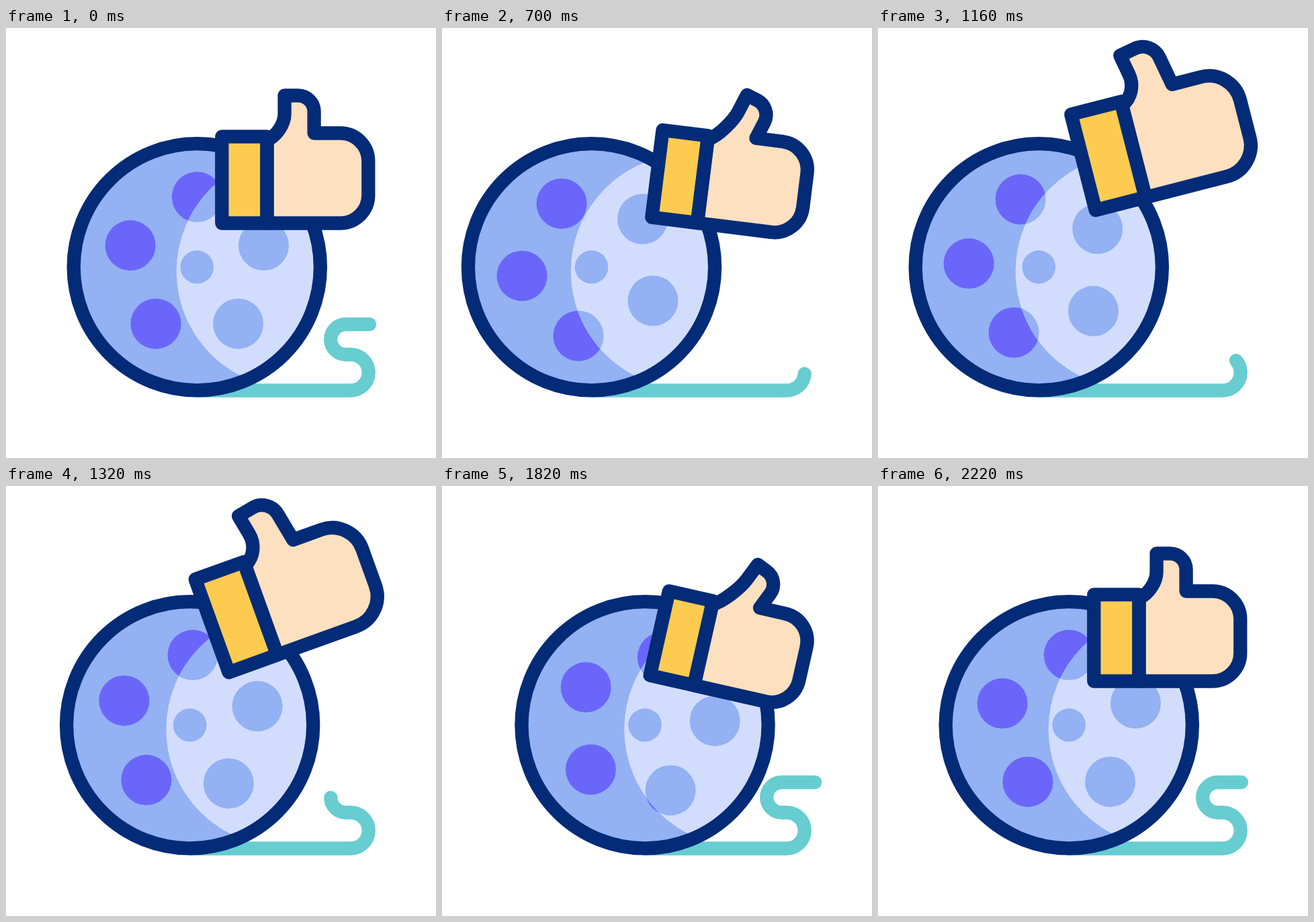
Write an HTML page with a canvas that moves like this. It is 640x640 px and loops after 2.4 s.

```html
<!DOCTYPE html>
<html lang="en">
<head>
<meta charset="utf-8">
<title>Rolling wheel and thumb</title>
<style>
html, body { margin: 0; width: 100%; height: 100%; overflow: hidden; background: #fff; }
canvas { display: block; width: 640px; height: 640px; }
</style>
</head>
<body>
<canvas id="stage" width="640" height="640"></canvas>
<script>
const ctx = document.getElementById('stage').getContext('2d');
const LOOP = 2400, LINE = 20.3, TAU = Math.PI * 2, DEG = Math.PI / 180;
const NAVY = '#032b77', BLUE = '#93b1f3', PALE = '#d2ddfd', PURPLE = '#6a66fa';
const TEAL = '#67cdd1', YELLOW = '#fdcb50', SKIN = '#fde0c0';
const START = 200, END = 2220;

// Smooth step from 0 to 1 between two times.
function ease(t, from, to) {
  const p = Math.min(1, Math.max(0, (t - from) / (to - from)));
  return p * p * (3 - 2 * p);
}

// Rises to 1, holds, then falls back to 0.
function bump(t, from, top, leave, to) {
  return ease(t, from, top) - ease(t, leave, to);
}

function disc(x, y, r, fill) {
  ctx.beginPath();
  ctx.arc(x, y, r, 0, TAU);
  ctx.fillStyle = fill;
  ctx.fill();
}

function drawThread(wheelX, pull) {
  const right = 513, left = 505.7, big = 26.75, small = 22.5;
  const length = right - wheelX + Math.PI * (big + small) +
    (right - left) + (540 - left) + pull;
  ctx.beginPath();
  ctx.moveTo(wheelX, 539.5);
  ctx.lineTo(right, 539.5);
  ctx.arc(right, 512.75, big, Math.PI / 2, -Math.PI / 2, true);
  ctx.lineTo(left, 486);
  ctx.arc(left, 463.5, small, Math.PI / 2, Math.PI * 1.5);
  ctx.lineTo(600, 441);
  ctx.setLineDash([length, 2000]);
  ctx.strokeStyle = TEAL;
  ctx.lineWidth = LINE;
  ctx.stroke();
  ctx.setLineDash([]);
}

function drawSpots(spin, fill) {
  for (let i = 0; i < 5; i++) {
    const a = (i * 72 - 90 + spin) * DEG;
    disc(104.3 * Math.cos(a), 104.3 * Math.sin(a), 37.5, fill);
  }
}

function drawWheel(x, spin, shade) {
  const r = 183.6;
  ctx.save();
  ctx.translate(x, 355.8);
  disc(0, 0, r, BLUE);
  drawSpots(spin, PURPLE);

  ctx.save();
  ctx.beginPath();
  ctx.arc(0, 0, r, 0, TAU);
  ctx.clip();
  ctx.beginPath();
  ctx.arc(143.6 + shade, 6.4, 174.2, 0, TAU);
  ctx.clip();
  ctx.fillStyle = PALE;
  ctx.fillRect(-200, -200, 400, 400);
  drawSpots(spin, BLUE);
  disc(0, 0, 24.8, BLUE);
  ctx.restore();

  ctx.beginPath();
  ctx.arc(0, 0, r, 0, TAU);
  ctx.strokeStyle = NAVY;
  ctx.lineWidth = LINE;
  ctx.stroke();
  ctx.restore();
}

// The thumb bends by an angle while the rest of the palm stays put.
function tracePalm(angle) {
  const a = angle * DEG, c = Math.cos(a), n = Math.sin(a);
  const tip = { x: 415 + 1.13 * angle, y: 100.5 - 0.26 * angle };
  const pit = { x: 459, y: 156.5 };
  const wide = (pit.x - tip.x) * c + (pit.y - tip.y) * n;
  ctx.beginPath();
  ctx.moveTo(389, 290.5);
  ctx.lineTo(498, 290.5);
  ctx.arcTo(539.7, 290.5, 539.7, 240, 41.7);
  ctx.arcTo(539.7, 156.5, 490, 156.5, 41.7);
  ctx.lineTo(pit.x, pit.y);
  ctx.arcTo(tip.x + wide * c, tip.y + wide * n, tip.x, tip.y, 24);
  ctx.lineTo(tip.x, tip.y);
  ctx.lineTo(tip.x - 27 * n, tip.y + 27 * c);
  ctx.bezierCurveTo(tip.x - 42 * n, tip.y + 42 * c, 404, 160, 389, 167);
  ctx.closePath();
}

function drawHand(x, y, tilt, size, thumb) {
  ctx.save();
  ctx.translate(x, y);
  ctx.rotate(tilt * DEG);
  ctx.scale(size, size);
  ctx.translate(-430, -225);
  ctx.lineWidth = LINE / size;
  ctx.strokeStyle = NAVY;

  tracePalm(thumb);
  ctx.fillStyle = SKIN;
  ctx.fill();
  ctx.stroke();

  ctx.beginPath();
  ctx.rect(321.7, 161.7, 67, 128.8);
  ctx.fillStyle = YELLOW;
  ctx.fill();
  ctx.stroke();
  ctx.restore();
}

function draw(t) {
  ctx.fillStyle = '#fff';
  ctx.fillRect(0, 0, 640, 640);
  ctx.lineCap = ctx.lineJoin = 'round';

  // Wheel: roll left, roll past the middle, settle.
  const back = bump(t, START, 900, 900, 1600);
  const forth = bump(t, 900, 1600, 1600, END);
  const wheelX = 284.3 - 76.9 * back + 25 * forth;
  const spin = -31.4 * back + 20.6 * forth;
  const shade = -4.7 * bump(t, 600, 1320, 1320, 1900);
  const pull = -195 * back - 4 * forth + 29 * bump(t, 1320, 1560, 1560, 2150);
  drawThread(wheelX, pull);
  drawWheel(wheelX, spin, shade);

  // Hand: dip, swing up and grow, then land and settle.
  const dip = ease(t, START, 600), land = bump(t, 1400, 1800, 1800, END);
  const fall = ease(t, 1400, 1800);
  const turn = ease(t, 600, 1400), grow = ease(t, 600, 1100), lift = ease(t, 600, 1240);
  const x = 429.6 - 7 * bump(t, 900, 1340, 1400, 1800);
  const y = 225 + 9 * (dip - fall) - 69 * (lift - fall) + 17 * land;
  const tilt = 8.4 * (dip - turn) - 20.6 * (turn - fall) + 12.8 * land;
  const size = 1 + 0.143 * (grow - fall);
  const thumb = 24 * (dip - grow + land) - 11 * (grow - fall);
  drawHand(x, y, tilt, size, thumb);
}

const start = performance.now();
function tick(now) {
  draw(Math.max(0, now - start) % LOOP);
  requestAnimationFrame(tick);
}
draw(0);
requestAnimationFrame(tick);
</script>
</body>
</html>
```
